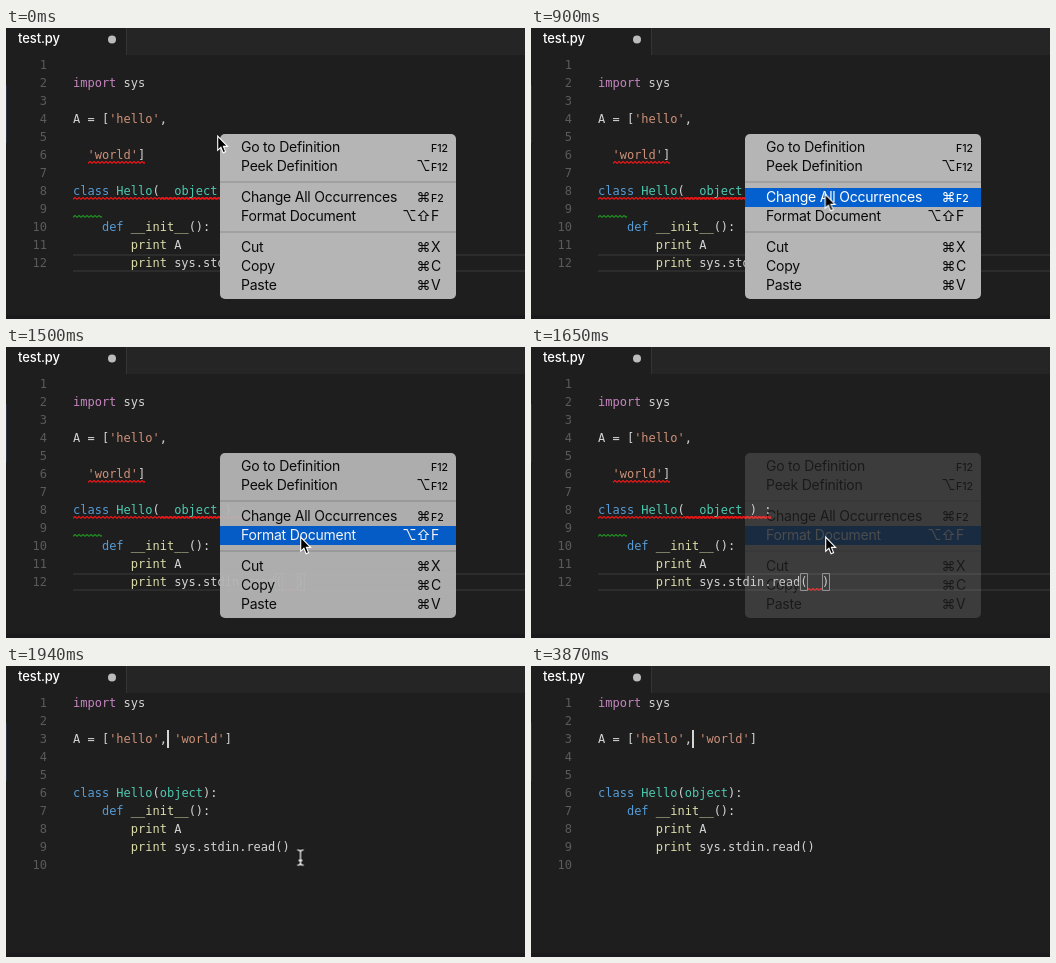
Write an HTML page that moves like this. It is 519 by 291 pixels and loops after 4000 ms.

```html
<!DOCTYPE html>
<html lang="en">
<head>
<meta charset="utf-8">
<title>Format Document</title>
<style>
html, body { margin: 0; width: 100%; height: 100%; overflow: hidden; background: #1e1e1e; }
body { position: relative; }
svg { position: absolute; left: 0; top: 0; }
pre {
  position: absolute; top: 28px; left: 67px; margin: 0; color: #d4d4d4;
  font: 12px/18px "DejaVu Sans Mono", monospace;
}
.nums { left: 0; width: 41px; text-align: right; color: #5a5a5a; }
.ui { font-family: Inter, "Open Sans", sans-serif; }
.k { color: #c586c0; }
.s { color: #ce9178; }
.d { color: #569cd6; }
.t { color: #4ec9b0; }
.f { color: #dcdcaa; }

/* Every change is a hard cut on a shared 4 s clock. */
.messy, .tidy, .caret, .menu, .row, .arrow, .beam { animation: 4s step-end infinite; }
.messy { animation-name: messy; }
.tidy { animation-name: tidy; }
.caret { animation-name: blink; }
.menu { animation-name: fade; }
.arrow { animation-name: point; }
.beam { animation-name: beam; }
.row { color: #0a0a0a; fill: transparent; }
.row text { fill: currentColor; font-size: 14px; letter-spacing: -.23px; }
.row .key { letter-spacing: 0; }
.row .mod { letter-spacing: 0; text-anchor: middle; }
.row .small { font-size: 10.5px; font-weight: 500; }
.goto { animation-name: goto; }
.change { animation-name: change; }
.format { animation-name: format; }

@keyframes messy { 0% { visibility: visible } 48.5%, 100% { visibility: hidden } }
@keyframes tidy { 0% { visibility: hidden } 48.5%, 100% { visibility: visible } }
@keyframes blink {
  0% { opacity: 0 } 48.5% { opacity: 1 } 59.75% { opacity: 0 }
  70.75% { opacity: 1 } 85.75% { opacity: 0 } 96.75%, 100% { opacity: 1 }
}
@keyframes fade {
  0% { opacity: 1 } 37.5% { opacity: .95 } 41.25% { opacity: .2 } 45%, 100% { opacity: 0 }
}
@keyframes goto {
  18.75% { color: #fff; fill: #0560cf }
  22.5%, 100% { color: #0a0a0a; fill: transparent }
}
@keyframes change {
  22.5% { color: #fff; fill: #0560cf }
  30%, 100% { color: #0a0a0a; fill: transparent }
}
@keyframes format {
  30% { color: #fff; fill: #0560cf }
  33.75% { color: #0a0a0a; fill: transparent }
  37.5%, 100% { color: #fff; fill: #0560cf }
}
@keyframes point {
  0% { transform: translate(211px, 107px); opacity: 1 }
  15% { transform: translate(235px, 105px); opacity: 1 }
  18.75% { transform: translate(267px, 121px); opacity: 1 }
  22.5% { transform: translate(293.5px, 165px); opacity: 1 }
  26.25% { transform: translate(294px, 182px); opacity: 1 }
  30% { transform: translate(294px, 189px); opacity: 1 }
  45%, 100% { transform: translate(294px, 189px); opacity: 0 }
}
@keyframes beam {
  0% { transform: translate(294.5px, 191.5px); opacity: 0 }
  45% { transform: translate(294.5px, 191.5px); opacity: 1 }
  85.75% { transform: translate(321.5px, 193px); opacity: 1 }
  89.5% { transform: translate(421.5px, 242px); opacity: 1 }
  93% { transform: translate(468.5px, 280px); opacity: 1 }
  96.75%, 100% { transform: translate(468.5px, 280px); opacity: 0 }
}
</style>
</head>
<body>
<svg width="519" height="291" class="ui">
  <rect x="120" width="399" height="27" fill="#252526"/>
  <rect x="120" width="1" height="27" fill="#343435"/>
  <rect y="57" width="1" height="58" fill="#293040"/>
  <rect y="287" width="519" height="4" fill="#1a1a1c"/>
  <text x="12" y="15" font-size="13" font-weight="500" letter-spacing="-.1" fill="#fff">test.py</text>
  <circle cx="106" cy="11.5" r="4" fill="#bcbcbc"/>
</svg>

<div class="messy">
  <svg width="519" height="291" fill="none">
    <defs>
      <pattern id="red" width="4" height="3" patternUnits="userSpaceOnUse">
        <path d="M-1 3 L2 .5 L5 3" stroke="#f01414" stroke-width="1.2"/>
      </pattern>
      <pattern id="green" width="4" height="3" patternUnits="userSpaceOnUse">
        <path d="M-1 3 L2 .5 L5 3" stroke="#1f8f1f" stroke-width="1.2"/>
      </pattern>
    </defs>
    <path d="M67 227H519M67 243H519" stroke="#2c2c2c" stroke-width="2"/>
    <rect width="57" height="3" transform="translate(82 133)" fill="url(#red)"/>
    <rect width="173" height="3" transform="translate(67 169)" fill="url(#red)"/>
    <rect width="86" height="3" transform="translate(154 169)" fill="url(#red)"/>
    <rect width="29" height="3" transform="translate(67 187)" fill="url(#green)"/>
    <rect width="15" height="3" transform="translate(276 241)" fill="url(#red)"/>
    <path d="M269.5 226.5h7v17h-7zM291.5 226.5h7v17h-7z" stroke="#888"/>
  </svg>
  <pre class="nums">1
2
3
4
5
6
7
8
9
10
11
12</pre>
  <pre>

<span class="k">import</span> sys

A = [<span class="s">'hello'</span>,

  <span class="s">'world'</span>]

<span class="d">class</span> <span class="t">Hello</span>(  <span class="t">object</span> ) :

    <span class="d">def</span> <span class="f">__init__</span>():
        <span class="f">print</span> A
        <span class="f">print</span> sys.stdin.read(  )</pre>
</div>

<div class="tidy">
  <pre class="nums">1
2
3
4
5
6
7
8
9
10</pre>
  <pre><span class="k">import</span> sys

A = [<span class="s">'hello'</span>, <span class="s">'world'</span>]


<span class="d">class</span> <span class="t">Hello</span>(<span class="t">object</span>):
    <span class="d">def</span> <span class="f">__init__</span>():
        <span class="f">print</span> A
        <span class="f">print</span> sys.stdin.read()</pre>
</div>

<svg width="519" height="291" class="ui">
  <rect class="caret" x="161" y="64" width="2" height="18" fill="#d4d4d4"/>
  <g class="menu">
    <rect x="214" y="106" width="236" height="165" rx="5" fill="#b5b5b5"/>
    <path d="M214 154H450M214 204H450" stroke="#a0a0a0" stroke-width="2"/>
    <g id="rows"></g>
  </g>
  <path class="arrow" d="M.7 1.2V15.3L3.9 12.3L6.1 17.7L8.6 16.6L6.4 11.4H10.6Z"
        fill="#000" stroke="#fff" stroke-width="1.1"/>
  <g class="beam" fill="none">
    <path id="bar" d="M-3.2-7.7Q0-7.7 0-5.5V5.5Q0 7.7-3.2 7.7M3.2-7.7Q0-7.7 0-5.5M0 5.5Q0 7.7 3.2 7.7M-2 3H2"
          stroke="#000" stroke-width="2.4"/>
    <path d="M-3.2-7.7Q0-7.7 0-5.5V5.5Q0 7.7-3.2 7.7M3.2-7.7Q0-7.7 0-5.5M0 5.5Q0 7.7 3.2 7.7M-2 3H2"
          stroke="#fff" stroke-width="1.3"/>
  </g>
</svg>

<script>
// top, label, modifiers, key, class
const items = [
  [110, 'Go to Definition', '', 'F12', 'goto'],
  [129, 'Peek Definition', '⌥', 'F12', ''],
  [160, 'Change All Occurrences', '⌘', 'F2', 'change'],
  [179, 'Format Document', '⌥⇧', 'F', 'format'],
  [210, 'Cut', '⌘', 'X', ''],
  [229, 'Copy', '⌘', 'C', ''],
  [248, 'Paste', '⌘', 'V', '']
];

const row = ([top, label, mods, key, name]) => {
  const base = top + 14;
  const text = (x, cls, s) => `<text x="${x}" y="${base}" class="${cls}">${s}</text>`;
  const marks = [...mods].reverse().map((m, i) => text(417.5 - 14 * i, 'mod', m)).join('');
  return `<g class="row ${name}"><rect x="214" y="${top}" width="236" height="19"/>` +
    text(235, '', label) + marks + text(425, key.length > 1 ? 'key small' : 'key', key) + '</g>';
};

document.getElementById('rows').innerHTML = items.map(row).join('');
</script>
</body>
</html>
```
